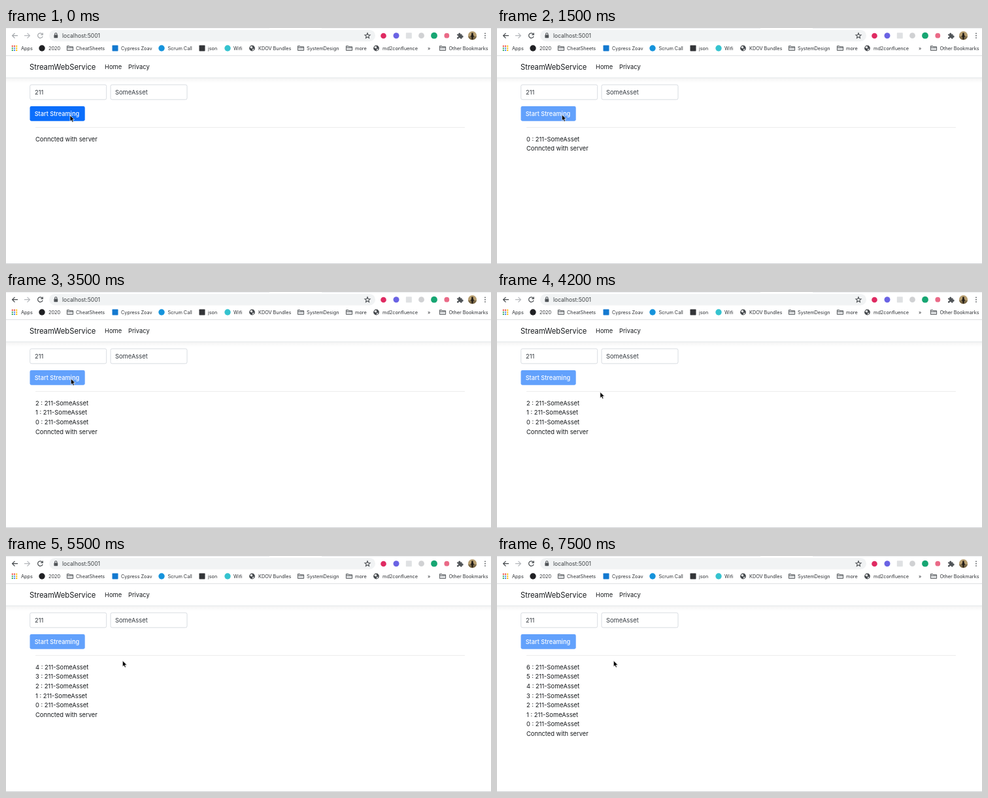
An HTML page for the animation above (8 s loop, 742 by 362 pixels).

```html
<!DOCTYPE html>
<html lang="en">
<head>
<meta charset="utf-8">
<title>StreamWebService</title>
<style>
  html, body { margin: 0; width: 100%; height: 100%; overflow: hidden; background: #fff; }
  svg { display: block; width: 100%; height: 100%; }
  text { font: 9.35px Inter, "Open Sans", sans-serif; fill: #16191c; white-space: pre; }
  .chrome text { font-size: 7.3px; fill: #2f3236; }
  .chrome .address { font-size: 8.5px; fill: #3c4043; }
  .line { fill: none; stroke: #4a4e52; stroke-width: 1.1; }
  .folder { fill: #dfe1e3; stroke: #4a4e52; stroke-width: .9; }
  .nav { fill: none; stroke-width: 1.2; }
  .brand { font-size: 11.25px; }
  .field { fill: #fff; stroke: #ced4da; stroke-width: .8; }
  .value { fill: #343a40; }
  #label { font-size: 9.2px; font-weight: 500; fill: #fff; }
</style>
</head>
<body>
<svg viewBox="0 0 742 362" preserveAspectRatio="none">
  <defs>
    <linearGradient id="shade" x2="0" y2="1">
      <stop stop-color="#000" stop-opacity=".045"/>
      <stop offset="1" stop-color="#000" stop-opacity="0"/>
    </linearGradient>
    <clipPath id="round"><circle cx="713.5" cy="11.7" r="6.6"/></clipPath>
    <path id="folder" class="folder" d="M-4.6-3.4h3.4l1.1 1.2h4.7v5.6h-9.2zM-4.6-1.1h9.2"/>
    <g id="globe">
      <circle r="4.4" fill="#45494d"/>
      <path d="M-3.2-1.5q1.4-2 3.6-1.8l-.6 1.6 1.3 1-1.6 1.2-1.3-.5zM.8 1.4l2.3-.8-1.4 2.6-1.5.2z" fill="#fff"/>
    </g>
  </defs>

  <g class="chrome">
    <path id="strip" d="M0 0h403v.5H0zM483 0h259v.5H483z"/>
    <path id="nav" class="nav" d="M18 11.7H9.7M13.5 7.8l-3.9 3.9 3.9 3.9M55.4 9.2a3.8 3.8 0 1 0 .7 3.4M56.2 7.4v3h-3"/>
    <path class="nav" stroke="#b4b7bb" d="M28 11.7h8.3M32.5 7.8l3.9 3.9-3.9 3.9"/>
    <rect x="66" y="3" width="499" height="17.4" rx="8.7" fill="#f1f3f4"/>
    <rect x="73.4" y="10.6" width="5.8" height="4.6" rx=".6" fill="#505458"/>
    <path class="line" d="M74.7 10.8V9.3a1.6 1.6 0 0 1 3.2 0v1.5"/>
    <text class="address" x="86" y="14.8">localhost:5001</text>
    <path id="star" class="line"/>
    <g id="extensions"></g>
    <path d="M690 9.4h2.3a1.5 1.5 0 1 1 2.9 0h2.4v2.3a1.5 1.5 0 1 1 0 2.8v2h-2.4a1.4 1.4 0 1 0-2.8 0H690v-2.4a1.4 1.4 0 1 0 0-2.6z" fill="#505458"/>
    <g clip-path="url(#round)">
      <rect x="706" y="5" width="15" height="14" fill="#b79e70"/>
      <rect x="706" y="13" width="15" height="6" fill="#7c6a48"/>
      <path d="M712.3 7.5h2.2l.5 4 1.8 1.2-2 .6-.5 4.5h-1.7l-.5-4.5-2-.6 1.8-1.2z" fill="#201b16"/>
    </g>
    <g fill="#505458">
      <circle cx="733" cy="8.3" r=".9"/><circle cx="733" cy="11.7" r=".9"/><circle cx="733" cy="15.1" r=".9"/>
    </g>
    <g id="bookmarks"></g>
    <path d="M0 42.4h742" stroke="#d5d7da" stroke-width=".8"/>
  </g>

  <rect y="76.5" width="742" height="8" fill="url(#shade)"/>
  <path d="M0 76.4h742" stroke="#dee2e6" stroke-width=".8"/>
  <text class="brand" x="36" y="64">StreamWebService</text>
  <text x="151" y="63.3">Home</text>
  <text x="187" y="63.3">Privacy</text>

  <rect class="field" x="36.7" y="87" width="117" height="22.8" rx="2.4"/>
  <text class="value" x="44" y="102">211</text>
  <rect id="ring" x="159" y="86" width="119" height="24.8" rx="3.2" fill="none" stroke="#0d6efd" stroke-opacity=".27" stroke-width="2.2"/>
  <rect id="asset" class="field" x="160" y="87" width="117" height="22.8" rx="2.4"/>
  <text class="value" x="167" y="102">SomeAsset</text>
  <path id="caret" d="M217.7 93.5v10" stroke="#222" stroke-width=".8"/>

  <rect id="button" x="36.5" y="120" width="84.2" height="22.7" rx="2.4"/>
  <text id="label" x="43.7" y="134.9">Start Streaming</text>
  <path d="M45 152.6h657" stroke="#000" stroke-opacity=".1" stroke-width=".8"/>
  <g id="log"></g>
  <path d="M0 361.5h742" stroke="#d0d2d5"/>
  <path id="cursor" d="M0 0v9.2l2.1-1.9 1.4 3.2 1.7-.7-1.4-3.2h2.9z" fill="#000" stroke="#fff" stroke-width=".7"/>
</svg>

<script>
const $ = id => document.getElementById(id);
const dot = (x, y, r, color) => `<circle cx="${x}" cy="${y}" r="${r}" fill="${color}"/>`;
const box = (x, y, r, color) => `<rect x="${x - r}" y="${y - r}" width="${2 * r}" height="${2 * r}" rx=".8" fill="${color}"/>`;
const symbol = name => x => `<use href="#${name}" x="${x}" y="31"/>`;
const disc = color => x => dot(x, 31, 4.7, color);
const tile = color => x => box(x, 31, 4.5, color);
const folder = symbol("folder"), globe = symbol("globe");
const grid = x => ["#ea4335", "#ea4335", "#fbbc04", "#34a853", "#4285f4", "#fbbc04", "#34a853", "#4285f4", "#fbbc04"]
  .map((color, i) => box(x - 3.2 + i % 3 * 3.2, 27.8 + Math.floor(i / 3) * 3.2, 1.1, color)).join("");

const bookmarks = [
  [grid, 13, 23, "Apps"],
  [disc("#202124"), 55, 65, "2020"],
  [folder, 98, 107, "CheatSheets"],
  [tile("#1479d0"), 167, 176, "Cypress Zoav"],
  [disc("#1593dc"), 238, 247.5, "Scrum Call"],
  [tile("#333538"), 300, 309, "json"],
  [disc("#35c3cf"), 339, 348, "Wifi"],
  [globe, 376.5, 386, "KDOV Bundles"],
  [folder, 451, 460, "SystemDesign"],
  [folder, 525, 534, "more"],
  [globe, 566.5, 576, "md2confluence"],
  [() => "", 0, 645, "»"],
  [folder, 668, 677.5, "Other Bookmarks"],
];
$("bookmarks").innerHTML = bookmarks.map(([icon, x, textX, name]) =>
  `${icon(x)}<text x="${textX}" y="33.7">${name}</text>`).join("");

$("extensions").innerHTML = dot(577.5, 12, 4.3, "#df2b62") + dot(597, 11.7, 4.5, "#6a63e4") +
  box(616.3, 11.7, 4.5, "#dfe1e3") + dot(635.5, 11.7, 4.4, "#d0d1d3") +
  dot(655, 11.7, 4.9, "#17a673") + dot(674.3, 11.7, 3.9, "#ea6a87");

$("star").setAttribute("d", "M" + Array.from({ length: 10 }, (_, i) => {
  const radius = i % 2 ? 1.9 : 4.3, angle = i * Math.PI / 5;
  return `${553 + radius * Math.sin(angle)} ${12 - radius * Math.cos(angle)}`;
}).join("L") + "Z");

const ramp = (t, from, to) => Math.min(1, Math.max(0, (t - from) / (to - from)));
const smooth = p => p * p * (3 - 2 * p);
const mix = (a, b, p) => a + (b - a) * p;
const blend = (a, b, p) => `rgb(${a.map((v, i) => mix(v, b[i], p)).join()})`;

let rowCount = -1;
function showLog(count) {
  if (count === rowCount) return;
  rowCount = count;
  const rows = Array.from({ length: count }, (_, i) => `${count - 1 - i} : 211-SomeAsset`);
  $("log").innerHTML = [...rows, "Conncted with server"]
    .map((row, i) => `<text x="45" y="${173.7 + i * 14.6}">${row}</text>`).join("");
}

function draw(t) {
  const active = ramp(t, 300, 600);
  const focus = ramp(t, 400, 700) * (1 - ramp(t, 1300, 1500));
  const disabled = ramp(t, 1300, 1500);
  const nudge = ramp(t, 0, 200);
  const travel = smooth(ramp(t, 3800, 4400));

  $("nav").style.stroke = blend([160, 164, 168], [65, 69, 73], active);
  $("strip").style.fill = blend([236, 238, 240], [218, 221, 225], active);
  $("ring").style.opacity = focus;
  $("asset").style.stroke = blend([206, 212, 218], [128, 181, 254], focus);
  $("caret").style.opacity = t >= 500 && t < 1100 ? 1 : 0;
  $("button").style.fill = blend([11, 110, 251], [98, 161, 252], disabled);
  $("cursor").setAttribute("transform",
    `translate(${mix(mix(98, 99.3, nudge), 178.3, travel)} ${mix(mix(134, 133, nudge), 160.6, travel)})`);
  showLog(t < 1500 ? 0 : Math.floor((t - 500) / 1000));
}

const start = performance.now();
function tick() {
  const elapsed = (performance.now() - start) % 8000;
  draw(Math.floor(elapsed / 100) * 100);
  requestAnimationFrame(tick);
}
tick();
</script>
</body>
</html>
```
